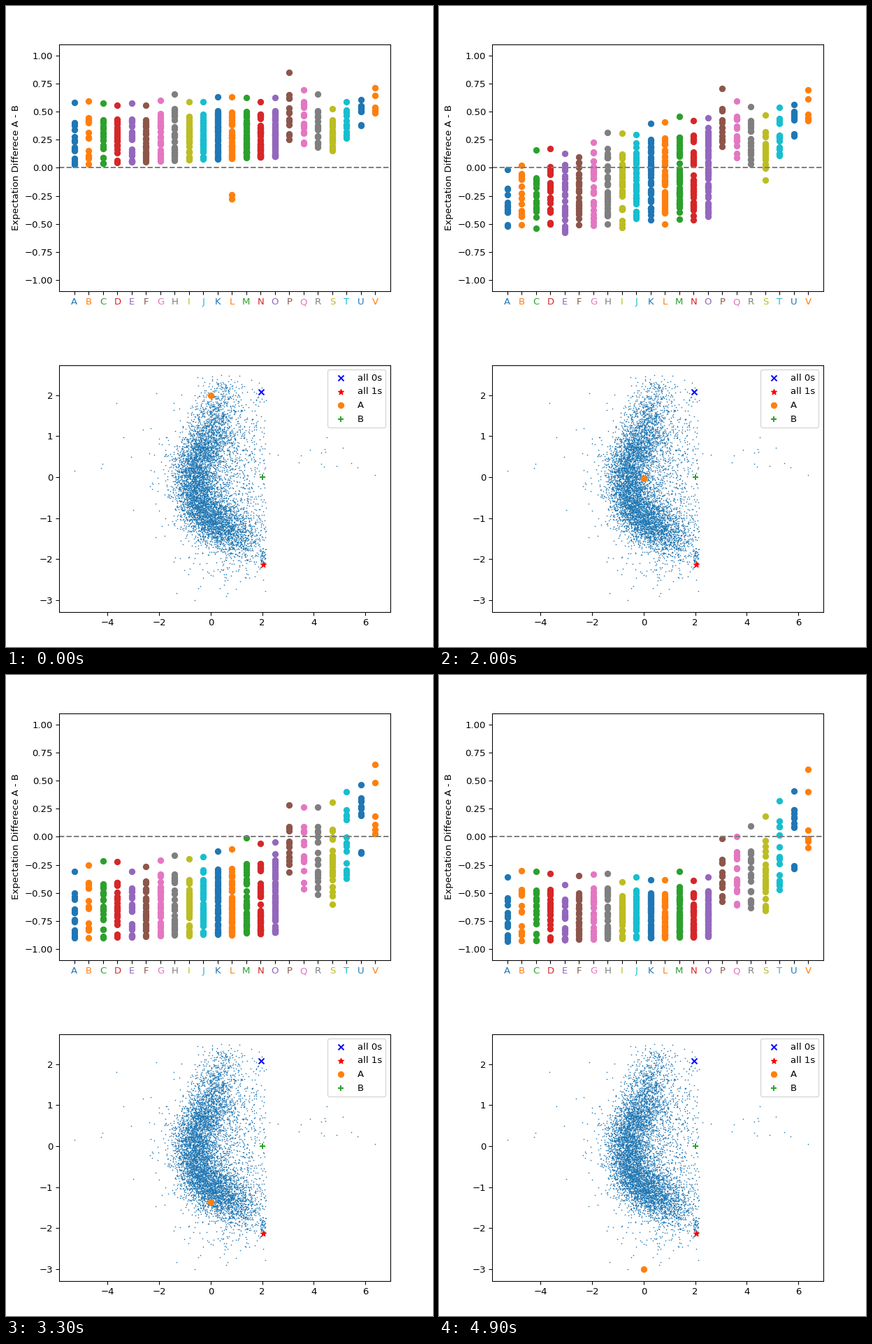
Recreate the animation shown at these times as a matplotlib script. Size 611 by 917 pixels, loop 5000 ms.

```python
import numpy as np
import matplotlib.pyplot as plt
from matplotlib.animation import FuncAnimation

FRAMES, INTERVAL = 50, 100
LAST = FRAMES - 1
LETTERS = "ABCDEFGHIJKLMNOPQRSTUV"

rng = np.random.default_rng(7)


def by_letter(*values):
    """Spread values given for A, O, P, S and V over all letters."""
    return np.interp(range(len(LETTERS)), [0, 14, 15, 18, 21], values)


def jitter(size=.04):
    return rng.normal(0, size, len(LETTERS))


counts = by_letter(14, 55, 13, 22, 6).astype(int)
start_low = by_letter(.03, .1, .25, .15, .49)
start_high = by_letter(.58, .63, .82, .6, .72) + jitter()
end_low = by_letter(-.93, -.89, -.58, -.66, -.1)
end_high = by_letter(-.31, -.36, -.05, .18, .6) + jitter()
fall_low = by_letter(19, 20, 30, 25, 28)     # frame halfway down
fall_high = by_letter(17, 31, 30, 28, 30)


def mix(a, b, share):
    return a + (b - a) * share


class Column:
    """Dots of one letter; each slides from start to end at its own moment."""

    def __init__(self, i):
        body = rng.uniform(0, .8, counts[i] - 2) ** 1.1
        u = np.concatenate([[0], body, [1]])
        self.start = mix(start_low[i], start_high[i], u)
        self.end = mix(end_low[i], end_high[i], u)
        self.middle = mix(fall_low[i], fall_high[i], u) + rng.normal(0, 1, len(u))
        self.width = mix(4, 6, u)
        if LETTERS[i] == "L":
            self.start[1:3] = -.24, -.28
        self.x = np.full(len(u), i)
        self.dots = ax.scatter(self.x, self.start, color=f"C{i % 10}")

    def remaining(self, frame):
        return 1 / (1 + np.exp((frame - self.middle) / self.width))

    def move(self, frame):
        first, last = self.remaining(0), self.remaining(LAST)
        share = (self.remaining(frame) - last) / (first - last)
        self.dots.set_offsets(np.column_stack([self.x, mix(self.end, self.start, share)]))


def make_cloud(n=7000):
    """A crescent with a soft inner side, a halo and a few strays."""
    s = rng.beta(2.2, 1.6, n)
    knots = [0, .15, .3, .45, .58, .7, .82, .92, 1]
    x = np.interp(s, knots, [.6, .25, -.1, -.6, -.75, -.45, .15, .9, 1.9])
    y = np.interp(s, knots, [2.45, 1.7, 1, .4, -.2, -.8, -1.15, -1.4, -1.7])
    wide = np.where(rng.random(n) < .14, 2, 1)
    x += rng.normal(0, .38, n) * wide
    y += rng.normal(0, .27, n) * wide
    inner = (rng.random(n) < .36) & (s < .85)
    x += inner * rng.exponential(.8, n)
    keep = (x < 2.15) & (x > -3) & (y < 2.48) & (y > -2.9)
    return np.vstack([
        np.column_stack([x, y])[keep],
        rng.normal((2.03, -1.95), (.06, .14), (40, 2)),
        rng.normal((.4, -2.3), (.6, .25), (50, 2)),
        rng.normal((4, .4), (.9, .35), (16, 2)),
        rng.normal((-3.7, -.1), (.5, .7), (6, 2)),
        [(-5.28, .15), (6.38, .05), (-.62, -3.01)],
    ])


fig, (ax, ax_map) = plt.subplots(2, 1, figsize=(6.398, 9.6021), dpi=95.5)
fig.subplots_adjust(left=.125, right=.9, top=.94, bottom=.055, hspace=.3)

columns = [Column(i) for i in range(len(LETTERS))]
ax.axhline(0, color="gray", linestyle="--")
ax.set_xlim(-1.05, 22.05)
ax.set_ylim(-1.1, 1.1)
ax.set_xticks(range(len(LETTERS)), LETTERS)
for i, label in enumerate(ax.get_xticklabels()):
    label.set_color(f"C{i % 10}")
ax.set_ylabel("Expectation Differece A - B")

ax_map.scatter(*make_cloud().T, s=.5, linewidths=.5, color="C0")
ax_map.scatter(1.95, 2.08, marker="x", color="b", label="all 0s")
ax_map.scatter(2.05, -2.14, marker="*", color="r", label="all 1s")
point_a = ax_map.scatter(0, 2, color="C1", label="A")
ax_map.scatter(2, 0, marker="+", color="C2", label="B")
ax_map.set_xlim(-5.866, 6.966)
ax_map.set_ylim(-3.285, 2.73)
ax_map.legend(loc="upper right")


def update(frame):
    for column in columns:
        column.move(frame)
    point_a.set_offsets([(0, mix(2, -3, frame / LAST))])
    return [column.dots for column in columns] + [point_a]


anim = FuncAnimation(fig, update, frames=FRAMES, interval=INTERVAL,
                     repeat=True, repeat_delay=0)
plt.show()
```
